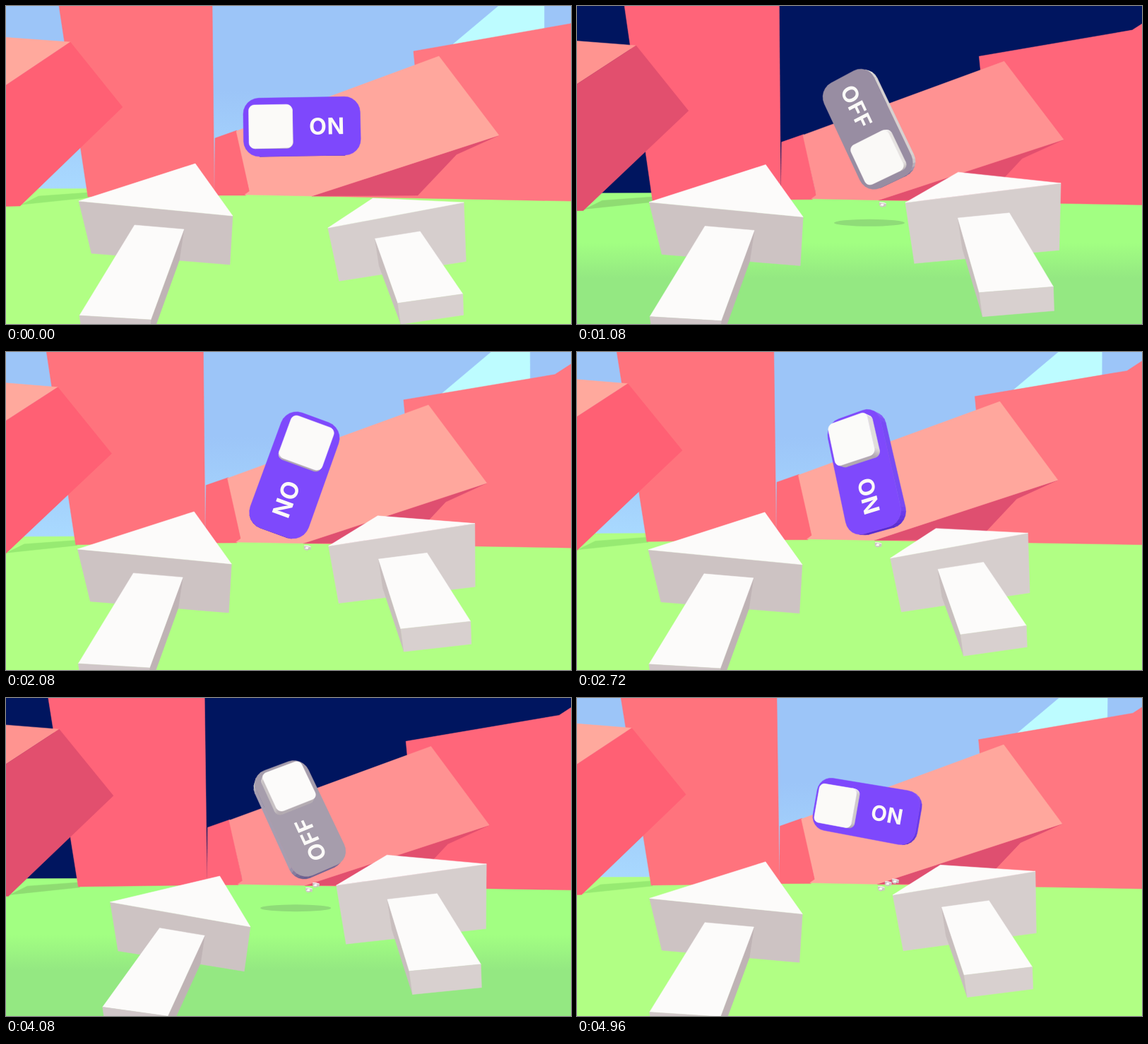
Write an HTML page that moves like this. It is 800 px wide and 450 px high and loops after 5000 ms.

```html
<!DOCTYPE html>
<html lang="en">
<head>
<meta charset="utf-8">
<title>Toggle range</title>
<style>
html, body { margin: 0; width: 100%; height: 100%; overflow: hidden; }
svg { display: block; width: 800px; height: 450px; }
text { font: 700 32px Inter, "Open Sans", sans-serif; text-anchor: middle; letter-spacing: .5px; }
</style>
</head>
<body>
<svg viewBox="0 0 800 450">
  <defs>
    <linearGradient id="sky" gradientUnits="userSpaceOnUse" x1="0" y1="120" x2="0" y2="265">
      <stop offset="0" stop-color="#9cc5f8"/><stop offset="1" stop-color="#a9daff"/>
    </linearGradient>
    <linearGradient id="dusk" gradientUnits="userSpaceOnUse" x1="0" y1="335" x2="0" y2="385">
      <stop offset="0" stop-color="#a2ff82"/><stop offset="1" stop-color="#94e882"/>
    </linearGradient>
  </defs>
  <g id="stage"></g>
</svg>
<script>
const LOOP = 5000, FOCAL = 450, RAD = Math.PI / 180, HIT = 280;
const stage = document.getElementById('stage');

// cam: pan, tilt; spin: x, y, scale, roll, pitch, yaw; aim: x, y, scale
const moves = [
  { at: 0,    cam: [0, 0],        spin: [419, 171, 1, -1, -3, 0],       aim: [552, 296, .88] },
  { at: 600,  cam: [0, 6],        spin: [418, 170, .94, -15, 50, 12],   aim: [574, 283, 1.01] },
  { at: 1560, cam: [-12, 5.4],    spin: [408, 178, 1.06, 141, -20, 0],  aim: [576, 246, .985] },
  { at: 2720, cam: [-12.2, -2.5], spin: [409, 170, 1.04, 72, 22, 14],   aim: [541, 274, .89] },
  { at: 3480, cam: [-8, -3.8],    spin: [405, 163, .92, 224, -88, 0],   aim: [563, 263, 1] },
  { at: 4080, cam: [-9.8, -3.6],  spin: [415, 171, 1, 248, 15, -12],    aim: [574, 250, .965] },
  { at: 4960, cam: [-8, -5.5],    spin: [410, 160, .92, 370, 0, 15],    aim: [548, 262, .92] }
];

// arrow outline: apex, left, right, lower left, lower right, then the shaft top
const leftPose = [268,223, 103,276, 321,297, 121,350, 317,366, 182,310, 252,316, 205,444, 104,438];
const rightPose = [527,235, 453,280, 673,247, 468,366, 673,342, 528,300, 601,291, 666,394, 561,405];
const flyPose = [347,204, 288,202, 397,222, 286,252, 391,271, 322,226, 360,233, 344,263, 299,256];

const shots = [
  { at: 100, rest: [439, 273] }, { at: 1480 },
  { at: 2850, rest: [449, 266] }, { at: 4200, rest: [460, 268] }
];

const mix = (a, b, k) => a + (b - a) * k;
const mixAll = (a, b, k) => a.map((v, i) => mix(v, b[i], k));
const clamp = v => Math.max(0, Math.min(1, v));

function move(name, t) {
  let i = 0;
  while (i < moves.length - 2 && t > moves[i + 1].at) i++;
  const a = moves[i], b = moves[i + 1];
  return mixAll(a[name], b[name], clamp((t - a.at) / (b.at - a.at)));
}

const rgb = h => [1, 3, 5].map(i => parseInt(h.slice(i, i + 2), 16));
// three tones: facing up, level, facing down
function tone(ramp, ny) {
  const c = mixAll(rgb(ramp[1]), rgb(ny < 0 ? ramp[0] : ramp[2]), Math.min(1, Math.abs(ny)));
  return `rgb(${c.map(Math.round)})`;
}

const poly = (pts, fill) => {
  const d = pts.map(p => p[0].toFixed(2) + ',' + p[1].toFixed(2)).join(' ');
  return `<polygon points="${d}" fill="${fill}" stroke="${fill}" stroke-width=".5" stroke-linejoin="round"/>`;
};
const pairs = a => a.reduce((r, v, i) => (i % 2 ? r[r.length - 1].push(v) : r.push([v]), r), []);
const area = pts => pts.reduce((s, p, i) => {
  const q = pts[(i + 1) % pts.length];
  return s + p[0] * q[1] - q[0] * p[1];
}, 0);

// turning the viewpoint shifts the far scenery in perspective
function camera(t) {
  const [a, b] = move('cam', t).map(v => v / FOCAL);
  return (x, y) => {
    const X = x - 400, Y = y - 225;
    const x1 = X * Math.cos(a) + FOCAL * Math.sin(a);
    const z1 = FOCAL * Math.cos(a) - X * Math.sin(a);
    const y2 = Y * Math.cos(b) + z1 * Math.sin(b);
    const k = FOCAL / (z1 * Math.cos(b) - Y * Math.sin(b));
    return [400 + x1 * k, 225 + y2 * k];
  };
}

function scenery(cam, night) {
  const shape = (pts, day, dark) => poly(pairs(pts).map(p => cam(...p)), night ? dark : day);
  let out = `<rect width="800" height="450" fill="${night ? '#00155f' : 'url(#sky)'}"/>`;
  if (!night) out += shape([745,-40, 633,54, 640,80, 762,60, 762,-40], '#bdfcff');
  out += shape([-90,259, 900,257, 900,560, -90,560], '#b1ff84', 'url(#dusk)');
  out += shape([22,281, 46,269, 116,264, 118,271], '#97ea72', '#8fdc72');
  out += shape([69,-40, 291.6,-40, 295,268, 116,270], '#ff737d', '#ff6479');
  out += shape([-90,36, 8,45, 91,51, 0,112, -90,172], '#ffa99d', '#ff9490');
  out += shape([91,51, 165,143, 20,283, -90,286, -90,172, 0,112], '#ff6074', '#e24f6e');
  out += shape([577,64, 799,25, 830,5, 900,-10, 900,278, 433,269, 590,200], '#ff7781', '#ff667a');
  out += shape([433,269, 698,183, 638,210, 583,268], '#df4f70', '#e24f6e');
  out += shape([296,187, 327,176, 345,262, 339,268, 295,268], '#ff6b79', '#ff657a');
  out += shape([326,177, 613,71, 698,183, 433,269, 338,267, 345,262], '#ffa79d', '#ff9292');
  if (night) {
    const [x, y] = cam(420, 301);
    out += `<ellipse cx="${x}" cy="${y}" rx="50" ry="5" fill="#8fdc78"/>`;
  }
  return out;
}

// moves the middle of the arrow head's front edge to x, y
function place(pose, x, y, scale, turn) {
  const ox = (pose[2] + pose[4]) / 2, oy = (pose[3] + pose[5]) / 2;
  const c = scale * Math.cos(turn * RAD), s = scale * Math.sin(turn * RAD);
  return pairs(pose).flatMap(([px, py]) => [
    x + (px - ox) * c - (py - oy) * s, y + (px - ox) * s + (py - oy) * c
  ]);
}

function arrow(pose, side) {
  const [apex, l, r, lb, rb, p, q, s, e] = pairs(pose);
  const w = r[0] - l[0], left = side < 0;
  const down = (v, h, dx) => [v[0] + dx * w, v[1] + h * w];
  const sLow = down(s, .155, left ? -.01 : .005), eLow = down(e, .155, .022);
  const flank = left
    ? [q, s, sLow, down(q, .2, -.03)]
    : [p, e, eLow, down(p, .2, .03)];
  return poly([l, r, rb, lb], left ? '#cdc3c3' : '#d6cecd') +
    poly([apex, r, l], '#fcfbfa') +
    poly(flank, left ? '#bfb3b5' : '#c8bebe') +
    poly([p, q, s, e], '#fcfbfa') +
    poly([e, s, sLow, eLow], left ? '#d0c6c8' : '#d8d0cf');
}

function toggle(t, night) {
  // at rest until the first hit
  const [cx, cy, size, ...turn] = move('spin', t < 600 ? clamp((t - 380) / 220) * 600 : t);
  const [cr, cp, cq] = turn.map(a => Math.cos(a * RAD));
  const [sr, sp, sq] = turn.map(a => Math.sin(a * RAD));
  const rot = (x, y, z) => {
    const x1 = x * cq + z * sq, z1 = z * cq - x * sq;
    const y2 = y * cp - z1 * sp, z2 = y * sp + z1 * cp;
    return [x1 * cr - y2 * sr, x1 * sr + y2 * cr, z2];
  };
  const project = (x, y, z) => {
    const [X, Y, Z] = rot(x, y, z), k = size * 900 / (900 + Z);
    return [cx + X * k, cy + Y * k];
  };
  const ring = (hw, hh, r, ox) => {
    const pts = [];
    for (let c = 0; c < 4; c++) for (let i = 0; i <= 6; i++) {
      const a = (c + i / 6) * Math.PI / 2;
      const sx = c === 0 || c === 3 ? 1 : -1, sy = c < 2 ? 1 : -1;
      pts.push([ox + sx * (hw - r) + r * Math.cos(a), sy * (hh - r) + r * Math.sin(a)]);
    }
    return pts;
  };
  const prism = (pts, z0, z1, faceRamp, sideRamp) => {
    let out = '';
    pts.forEach((a, i) => {
      const b = pts[(i + 1) % pts.length];
      const dx = b[0] - a[0], dy = b[1] - a[1], len = Math.hypot(dx, dy);
      if (len < .01) return;
      const quad = [project(...a, z0), project(...b, z0), project(...b, z1), project(...a, z1)];
      if (area(quad) < 0) out += poly(quad, tone(sideRamp, rot(dy / len, -dx / len, 0)[1]));
    });
    for (const [z, dir] of [[z0, 1], [z1, -1]]) {
      const face = pts.map(p => project(...p, z));
      if (area(face) * dir > 0) out += poly(face, tone(faceRamp, rot(0, 0, -dir)[1]));
    }
    return out;
  };
  const label = dir => {
    const x = (night ? -35 : 35) * dir, z = -9 * dir;
    const o = project(x, 0, z), u = project(x + dir, 0, z), v = project(x, 1, z);
    if (area([o, u, v]) <= .01) return '';
    const m = [u[0] - o[0], u[1] - o[1], v[0] - o[0], v[1] - o[1], ...o].map(n => n.toFixed(4));
    return `<text y="11.5" fill="#fbfaf8" transform="matrix(${m})">${night ? 'OFF' : 'ON'}</text>`;
  };
  const face = night ? ['#c8c2c4', '#998ea3', '#655a8c'] : ['#8a58ff', '#7d47fc', '#6836e6'];
  const rim = night ? ['#e8e5e0', '#cac4c6', '#655a8c'] : ['#946aff', '#6d3df0', '#562bcb'];
  const white = ['#ffffff', '#fbfaf8', '#cfcac8'], gray = ['#fbfaf8', '#d6d1d0', '#b0a7ae'];
  const knob = dir => prism(ring(30, 30, 8, (night ? 43 : -43) * dir),
    dir > 0 ? -26 : 9, dir > 0 ? -9 : 26, white, gray);
  const near = rot(0, 0, -1)[2] < 0 ? 1 : -1;
  return knob(-near) + prism(ring(82, 41, 22, 0), -9, 9, face, rim) + label(near) + knob(near);
}

// slow drift, with a push forward before the last shot
function leftHome(t) {
  const push = Math.exp(-(((t - 4080) / 550) ** 2)), drift = t / LOOP;
  return place(leftPose, 212 - 4 * drift + 38 * push, 286.5 + 7 * drift + 14 * push,
    1 - .08 * push, 4.5 * push);
}

// a fresh arrow slides up after each shot
function leftArrow(t) {
  const last = shots.filter(s => s.at <= t).pop();
  const rise = last ? clamp((t - last.at - 150) / 300) : 1;
  if (!rise) return '';
  const drop = 240 * (1 - rise) ** 3;
  return arrow(leftHome(t).map((v, i) => i % 2 ? v + drop : v), -1);
}

function rightArrow(t) {
  const [x, y, scale] = move('aim', t);
  return arrow(place(rightPose, x, y, scale, (scale - .95) * 30), 1);
}

// leaves the hand, strikes the switch, then drops to the ground
function shotArrow(shot, t, cam) {
  const age = t - shot.at;
  if (age < 0 || (!shot.rest && age > HIT)) return '';
  if (age < 80) return arrow(mixAll(leftHome(shot.at), flyPose, age / 80), -1);
  const flown = [342, 212, 1], struck = [430, 189, .35];
  if (age < HIT) return arrow(place(flyPose, ...mixAll(flown, struck, (age - 80) / (HIT - 80)), 0), -1);
  const fall = clamp((age - HIT) / 500), [x, y] = cam(...shot.rest);
  const scale = mix(.085, .35, (1 - fall) ** 2);
  return arrow(place(flyPose, mix(430, x, fall), mix(189, y, fall ** 2), scale, 0), -1);
}

function draw(t) {
  const cam = camera(t);
  const night = shots.filter(s => t >= s.at + HIT).length % 2 === 1;
  stage.innerHTML = scenery(cam, night) + toggle(t, night) +
    shots.map(s => shotArrow(s, t, cam)).join('') + leftArrow(t) + rightArrow(t);
}

const start = performance.now();
function tick() {
  draw((performance.now() - start) % LOOP);
  requestAnimationFrame(tick);
}
tick();
</script>
</body>
</html>
```
